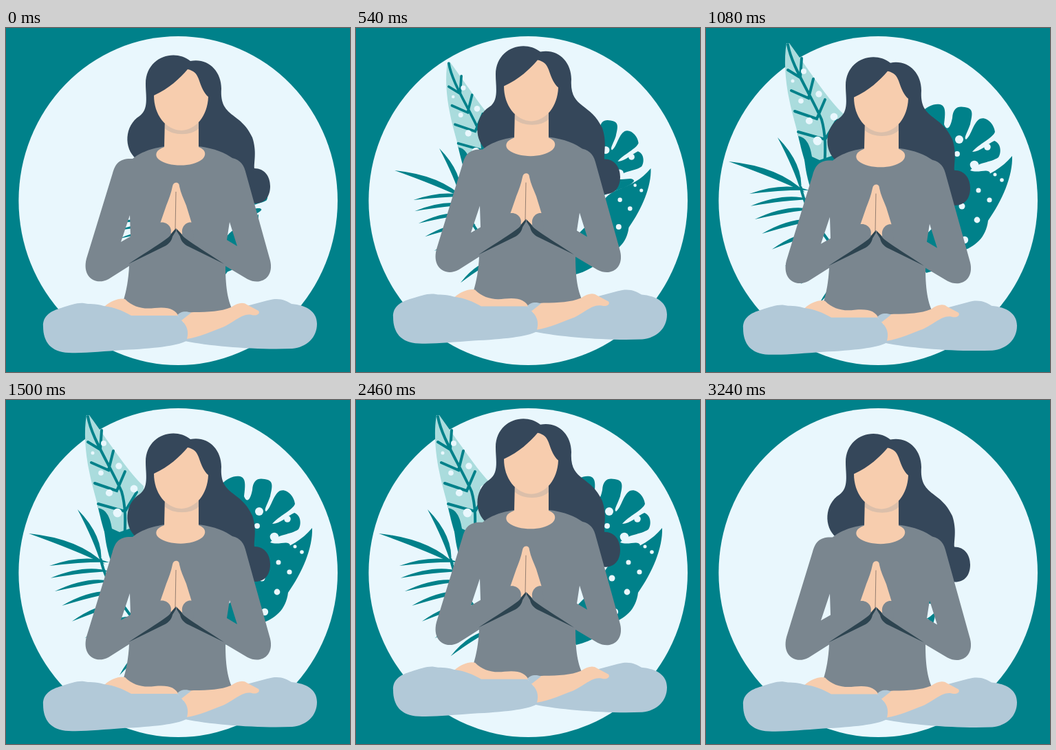
These frames come from a looping animation (500 px wide and 500 px high, 3.27 s). An HTML page:

```html
<!DOCTYPE html>
<html lang="en">
<head>
<meta charset="utf-8">
<title>Meditation</title>
<style>
html, body { margin: 0; width: 100%; height: 100%; overflow: hidden; background: #00818a; }
svg { display: block; width: 100%; height: 100%; }
.teal { fill: #00818a; }
.rib { fill: none; stroke: #00818a; stroke-width: 4; stroke-linecap: round; }
.dots { fill: #e9f7fd; }
.skin { fill: #f7cdae; }
.cloth { fill: #7a868f; }
.trousers { fill: #b2c9d8; }
.shade { fill: #2d4450; }
</style>
</head>
<body>
<svg viewBox="0 0 500 500">
  <rect class="teal" width="500" height="500"/>
  <ellipse cx="250.2" cy="251" rx="231.8" ry="239" fill="#e9f7fd"/>

  <g id="spotted">
    <path class="teal" d="M445 186C430 204 412 213 393 220C374 226 362 246 350 270L300 320L320 356C345 350 361 339 370 325C391 318 407 305 410 280C431 250 446 215 445 186Z"/>
    <g id="spottedDots" class="dots"></g>
  </g>
  <g id="monstera">
    <path class="teal" d="M300 150C305 125 324 108 340 111C349 113 348 124 346 140C350 150 355 146 358 131C359 116 366 113 376 115C390 117 387 126 384 140C380 152 374 160 378 162C386 156 388 138 398 132C408 128 419 140 420 151C417 160 396 169 387 180C398 180 409 169 419 164C430 168 429 183 425 188C414 196 394 195 384 207C396 212 410 203 413 211C406 222 380 226 365 234L310 225Z"/>
    <g id="monsteraDots" class="dots"></g>
  </g>
  <g id="left">
    <g id="palm" class="teal"></g>
    <path class="teal" d="M133 153L200 140L205 215L160 225C147 211 141 187 133 153Z"/>
    <path fill="#aadcdd" d="M117 22C113 45 115 76 121 104C125 125 131 142 134 157C145 159 151 168 154 187L165 192L200 180V125C179 106 158 73 121 22Z"/>
    <path id="veins" class="rib"/>
    <g id="leafDots" class="dots"></g>
  </g>

  <g id="person">
    <path fill="#35475a" d="M189 190C171 175 172 142 194 128C208 118 203 99 203 81C203 43 244 29 268 48C293 43 313 62 313 88C310 131 341 121 358 159C365 180 360 195 361 204C376 204 384 216 384 230C384 246 375 256 360 255L250 240Z"/>
    <path class="cloth" fill-rule="evenodd" d="M231 172C205 176 193 183 184 190C165 189 159 197 155 211L117 335C110 362 130 375 149 365L179 346C178 366 175 382 171 395L190 418H334C323 402 319 380 319 346L351 365C370 375 390 363 384 338L349 212C346 199 341 192 329 189C319 182 304 175 280 172ZM180 272L181 303L167 311ZM325 282L336 317L321 308Z"/>
    <path class="skin" d="M231 130H280V173C293 178 290 187 285 191C270 203 236 202 222 191C215 185 218 177 230 173Z"/>
    <path fill="#dbbfaa" d="M231 136H280V146C270 157 242 157 231 146Z"/>
    <path class="skin" d="M215 98C237 88 253 73 264 60C273 62 277 66 280 74C284 86 288 95 294 100C293 128 276 148 255 149C232 148 215 126 215 98Z"/>
    <path id="sleeveShade" class="shade" d="M247 288L239 301C236 306 222 314 178 343L229 318C238 314 241 308 242 303L247 295Z"/>
    <use href="#sleeveShade" transform="matrix(-1 0 0 1 495 0)"/>
    <path class="skin" d="M242 230C243 223 252 223 252 230C254 240 258 248 262 258L270 284C262 286 257 292 256 300L247 291L240 299C237 290 232 284 224 284L233 258C237 248 240 240 242 230Z"/>
    <path d="M247 238L246 293" stroke="#7d6a60" stroke-width=".8"/>
    <path class="cloth" d="M223 283C234 280 243 291 239 299L222 310ZM271 283C261 280 253 292 257 300L273 309Z"/>

    <path class="trousers" d="M250 430L335 408L380 396C397 391 407 396 415 401C437 403 452 412 452 430C452 450 437 464 416 466C365 468 299 463 260 455Z"/>
    <path class="skin" d="M143 405C153 396 165 392 173 394C185 406 199 409 216 407C237 405 246 409 251 419L235 425H185Z"/>
    <path class="trousers" d="M54 434C53 418 66 411 80 407C93 403 104 399 113 400C121 402 130 400 142 404C158 406 170 411 182 418L248 418C261 426 265 442 262 455C248 462 215 466 170 468C140 470 115 473 91 472C65 471 54 456 54 434Z"/>
    <path class="skin" d="M254 424C258 416 264 413 273 413C295 413 312 412 327 406C337 399 345 398 350 402L367 411C370 415 365 419 357 417C343 414 332 428 315 435C299 441 281 449 263 452C266 440 263 432 254 424Z"/>
    <path class="trousers" d="M249 418C252 412 262 411 269 414L255 425Z"/>
  </g>
</svg>
<script>
const LOOP = 3270, STEP = 30;
const byId = id => document.getElementById(id);
const repeat = (count, draw) => Array.from({ length: count }, (_, i) => draw(i)).join('');
const lerp = (a, b, u) => a + (b - a) * u;
const bezier = (a, b, c, u) => a.map((_, k) =>
  lerp(lerp(a[k], b[k], u), lerp(b[k], c[k], u), u));

// A straight row of dots whose radius grows along the way.
const dotRow = (count, [x, y], [dx, dy], r, grow) => repeat(count, i =>
  `<circle cx="${x + i * dx}" cy="${y + i * dy}" r="${r + i * grow}"/>`);

// A tapering blade from tip to base, bowed to one side and widest near its base.
function frond(tip, base, bow = 9, width = 6) {
  const dx = base[0] - tip[0], dy = base[1] - tip[1], length = Math.hypot(dx, dy);
  const side = offset => [
    lerp(tip[0], base[0], 0.6) + dy / length * offset,
    lerp(tip[1], base[1], 0.6) - dx / length * offset
  ];
  return `<path d="M${tip}Q${side(bow + width)} ${base}Q${side(bow - width)} ${tip}Z"/>`;
}

byId('palm').innerHTML =
  frond([33, 194], [144, 239], 12, 9) +
  frond([104, 159], [138, 238], 12, 8) +
  frond([142, 178], [154, 238], 3, 8) +
  repeat(8, i => frond(
    bezier([63, 241], [62, 300], [165, 400], i / 7),
    bezier([150, 236], [150, 280], [215, 355], i / 7))) +
  '<path class="rib" d="M138 232C144 265 175 315 230 365"/>';

byId('veins').setAttribute('d', 'M119 24C124 54 149 91 168 133C174 154 174 176 172 205' +
  repeat(4, i => {
    const x = 137 + 12 * i, y = 72 + 30 * i;
    return `M${x - 18 - 7 * i} ${y - 11}L${x} ${y}L${x + 2 + 5 * i} ${y - 28}`;
  }));

byId('leafDots').innerHTML =
  dotRow(4, [126, 77], [12, 29], 2.5, 1.3) + dotRow(3, [142, 63], [22, 33], 4, 0.7);
byId('monsteraDots').innerHTML =
  dotRow(2, [368, 162], [22, 37], 6, 0.3) + dotRow(2, [365, 183], [44, -10], 4, 0.8);
byId('spottedDots').innerHTML =
  dotRow(4, [430, 221], [-18, 29], 2.8, 0.8) + dotRow(3, [420, 213], [-24, 23], 2.5, 1);

function leafScale(t) {
  if (t < 1000) return 1 - 0.4 * (1 - t / 1000) ** 2;
  if (t < 2460) return 1;
  return 1 - 0.3 * (1 - Math.cos(Math.PI * (t - 2460) / 900));
}

function scaleAbout(id, x, y, scale) {
  byId(id).setAttribute('transform',
    `translate(${x} ${y}) scale(${scale}) translate(${-x} ${-y})`);
}

function render(t) {
  const scale = leafScale(t);
  scaleAbout('left', 306, 348, scale);
  scaleAbout('monstera', 309, 344, scale);
  scaleAbout('spotted', 250, 398, scale);
  const bob = -2 + 11.5 * Math.cos(2 * Math.PI * (t - 1415) / 1820);
  byId('person').setAttribute('transform', `translate(0 ${bob})`);
}

const start = performance.now();
function tick() {
  const t = (performance.now() - start) % LOOP;
  render(Math.floor(t / STEP) * STEP);
  requestAnimationFrame(tick);
}
tick();
</script>
</body>
</html>
```
